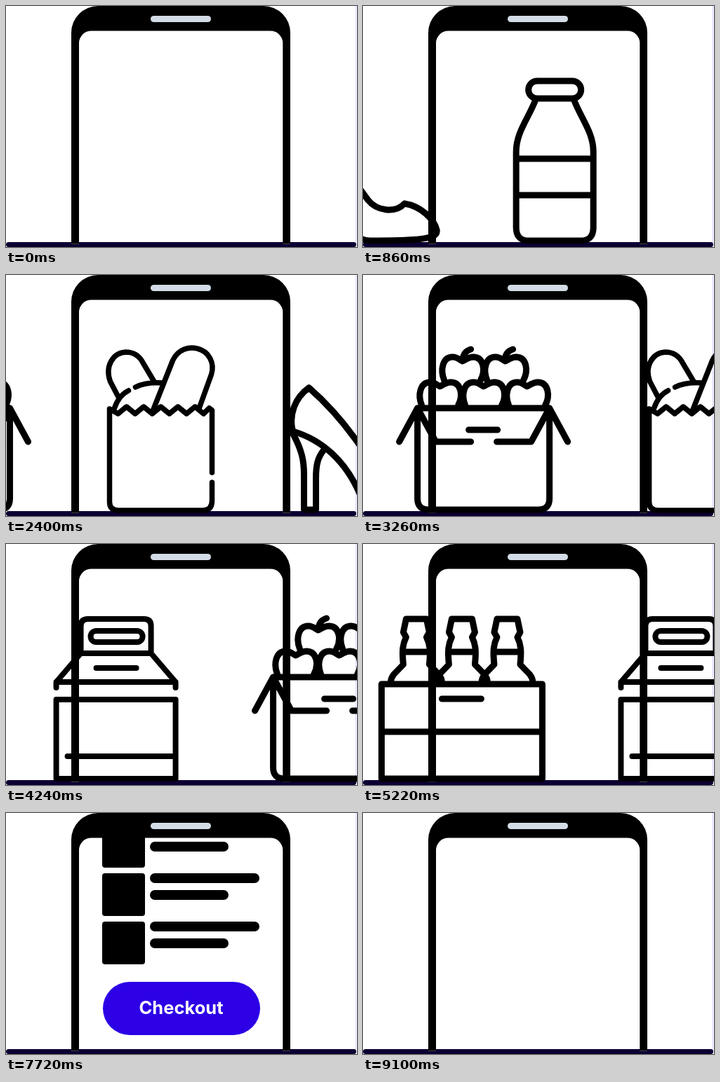
Write an HTML page with a canvas that moves like this. It is 500 by 344 pixels and loops after 9140 ms.

```html
<!DOCTYPE html>
<html lang="en">
<head>
<meta charset="utf-8">
<title>Shopping to checkout</title>
<style>
  html, body { margin: 0; width: 100%; height: 100%; overflow: hidden; background: #fff; }
  canvas { display: block; }
</style>
</head>
<body>
<canvas id="stage" width="500" height="344"></canvas>
<script>
const LOOP = 9140, CENTER = 249;
const ctx = document.getElementById('stage').getContext('2d');

const apple = (x, y) => `M${x - 26} ${y + 33}C${x - 32} ${y + 18} ${x - 28} ${y} ${x - 14} ${y}
  C${x - 7} ${y} ${x - 3} ${y + 5} ${x} ${y + 6}C${x + 4} ${y + 4} ${x + 9} ${y} ${x + 16} ${y}
  C${x + 31} ${y + 1} ${x + 33} ${y + 20} ${x + 26} ${y + 33}`;
const stem = x => `M${x} 122C${x + 1} 113 ${x + 5} 108 ${x + 12} 106`;
const beer = x => `M${x - 36.5} 197Q${x - 36} 191 ${x - 32} 186L${x - 18.5} 172C${x - 20.5} 152 ${x - 19.5} 143 ${x - 14.5} 133
  L${x - 18.5} 126L${x - 14.5} 107H${x + 14.5}L${x + 18.5} 126L${x + 14.5} 133C${x + 19.5} 143 ${x + 20.5} 152 ${x + 18.5} 172
  L${x + 32} 186Q${x + 36} 191 ${x + 36.5} 197M${x - 19.5} 154H${x + 19.5}`;
const egg = x => `M${x - 36} 255C${x - 34} 225 ${x - 16} 207 ${x} 207S${x + 34} 225 ${x + 36} 255`;
const zigzag = 'l12.2 -10l12.2 10'.repeat(5);

// mid: centre of the drawing; at: place on the belt; time: when it stands mid-screen
const goods = [
  { mid: 525, at: 0, time: 685, path: `M498 133C488 160 470 180 470 208V316Q470 335 488 335H562Q580 335 580 316V208
      C580 180 562 160 552 133M470 218H580M470 270H580
      M500 107H550A12 12 0 0 1 550 132H500A12 12 0 0 1 500 107Z` },
  { mid: 247, at: 278, time: 1609, path: `M162 161C192 187 212 212 228 234L259 277C272 293 298 296 311 282
      C335 286 353 304 357 320C358 330 345 331 330 333C310 335 285 335 262 335C246 335 240 325 236 316
      C215 265 180 235 139 223C133 200 142 175 162 161Z
      M139 226C152 250 155 265 155 285V335H172V290C172 270 175 260 183 250` },
  { mid: 480, at: 574, time: 2600, width: 7.5, path: `M553 296V322Q553 336 540 336H420Q407 336 407 324V191L419 198${zigzag}L549 190L553 193V282
      M420 175L408 152C400 130 412 111 430 110C442 110 450 116 455 126L471 153
      M414 190C418 178 424 170 434 165M444 160C456 154 468 153 482 154
      M469 193L497 122C505 105 521 102 532 105C549 109 557 126 552 142L534 192` },
  { mid: 171, at: 883, time: 3592, path: `M77 190H265V319Q265 335 249 335H93Q77 335 77 319V190
      L51 238M77 190L103 238H153M265 190L291 238M265 190L239 238H190M150 221H191
      ${apple(109, 153)}${apple(171, 153)}${apple(233, 153)}
      ${apple(141, 117)}${apple(202, 117)}${stem(141)}${stem(201)}` },
  { mid: 452, at: 1201, time: 4610, width: 8, path: `M402 156V117Q402 107 412 107H492Q502 107 502 117V156Z
      M424 124H482A8 8 0 0 1 482 140H424A8 8 0 0 1 424 124ZM424 177H481
      M367 205V197L402 156M367 197H537M502 156L537 197V205M367 222H537V335H367ZM383 303H537` },
  { mid: 140.5, at: 1512.5, time: 5630, path: `M26 200H255V335H26ZM26 268H255M112 221H168
      ${beer(75.5)}${beer(140.5)}${beer(205)}` },
  { mid: 186, at: 1859, time: 6561, path: `M145 280H66V257H305V280H226${egg(114)}${egg(186)}${egg(258)}
      M78 283V300L98 335H131L141 315H158L168 335H204L214 315H230L240 335H273L293 300V283` }
];
for (const item of goods) item.outline = new Path2D(item.path);

const phone = new Path2D(`M93 339V38A38 38 0 0 1 131 0H367A38 38 0 0 1 405 38V339H394.3V53
  A17.5 17.5 0 0 0 376.8 35.5H121.5A17.5 17.5 0 0 0 104 53V339Z`);

const stops = [{ time: 20, at: -310 }, ...goods, { time: 7545, at: 2235 }];
const clamp = v => Math.min(1, Math.max(0, v));
const easeInOut = p => (1 - Math.cos(Math.PI * p)) / 2;
const easeOut = p => 1 - (1 - p) ** 3;
const easeInBack = p => 2.25 * p ** 3 - 1.25 * p ** 2;

function beltAt(t) {
  let belt = stops[0].at;
  for (let i = 1; i < stops.length; i++) {
    const a = stops[i - 1], b = stops[i];
    belt += (b.at - a.at) * easeInOut(clamp((t - a.time) / (b.time - a.time)));
  }
  return belt;
}

function listShift(t) {
  return t < 8700
    ? 327 * (1 - easeOut(clamp((t - 7340) / 380)))
    : -300 * easeInBack(clamp((t - 8700) / 400));
}

function box(x, y, w, h, radius, color) {
  ctx.fillStyle = color;
  ctx.beginPath();
  ctx.roundRect(x, y, w, h, radius);
  ctx.fill();
}

function drawList(shift) {
  ctx.save();
  ctx.translate(0, shift);
  for (const y of [17, 86, 155]) {
    box(137, y, 61, 61, 4, '#000');
    box(205, y, 156, 14, 7, '#000');
    box(205, y + 24, 112, 14, 7, '#000');
  }
  box(138, 241, 224, 76, 38, '#2d00e6');
  ctx.font = '700 25.5px Inter, sans-serif';
  ctx.textAlign = 'center';
  ctx.fillStyle = '#fff';
  ctx.fillText('Checkout', 249.5, 287);
  ctx.restore();
}

function drawPhone() {
  ctx.fillStyle = '#000';
  ctx.fill(phone);
  box(93, 339, 11, 1, 0, '#444');
  box(394, 339, 11, 1, 0, '#444');
  box(206, 14, 86, 9, 4.5, '#d3dce6');
}

function drawGoods(belt) {
  ctx.strokeStyle = '#000';
  ctx.lineCap = ctx.lineJoin = 'round';
  for (const item of goods) {
    ctx.save();
    ctx.translate(CENTER + belt - item.at - item.mid, 0);
    ctx.lineWidth = item.width || 9;
    ctx.stroke(item.outline);
    ctx.restore();
  }
}

function draw(now) {
  const t = now % LOOP;
  ctx.fillStyle = '#fff';
  ctx.fillRect(0, 0, 500, 344);
  box(498, 0, 1, 338, 0, '#d9ccff');
  box(0, 337, 499, 7, 3.5, '#0c0033');
  if (t > 7340 && t < 9100) drawList(listShift(t));
  drawPhone();
  drawGoods(beltAt(t));
  requestAnimationFrame(draw);
}
draw(0);
</script>
</body>
</html>
```
